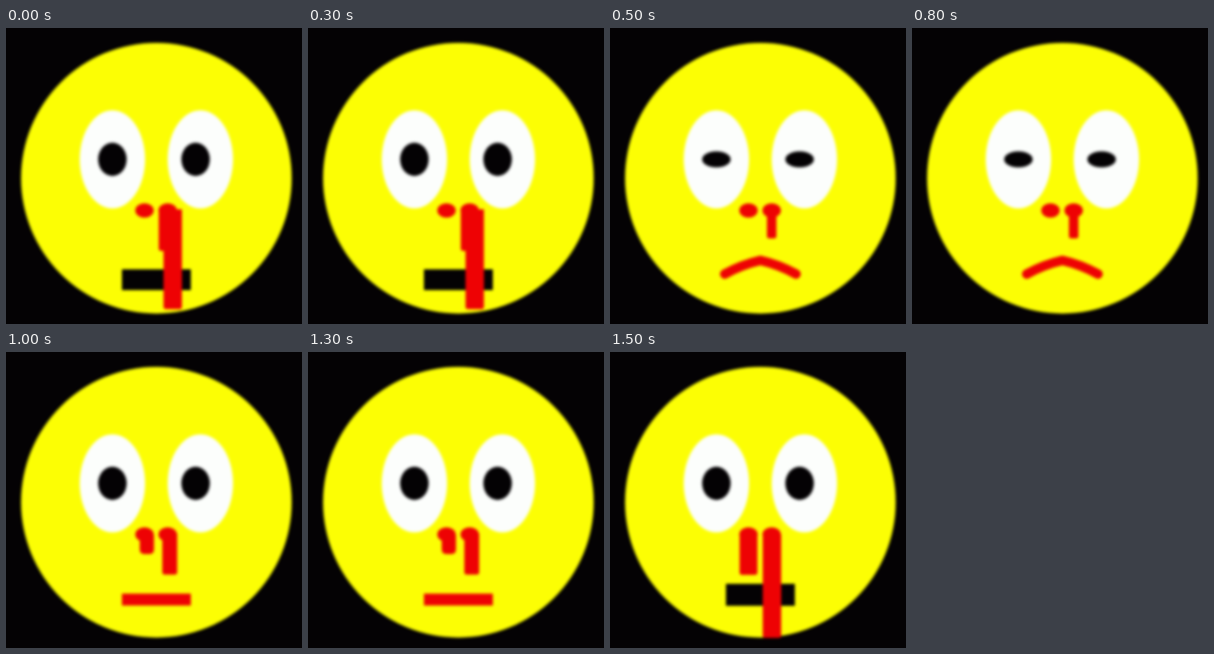
These frames come from a looping animation (498x498 px, 2 s). An HTML page:

```html
<!DOCTYPE html>
<html lang="en">
<head>
<meta charset="utf-8">
<title>Nosebleed face</title>
<style>
html, body { margin: 0; width: 100%; height: 100%; overflow: hidden; background: #040204; }
svg { display: block; width: 100vw; height: 100vh; }
</style>
</head>
<body>
<svg viewBox="0 0 498 498">
  <defs>
    <filter id="soft" filterUnits="userSpaceOnUse" x="0" y="0" width="498" height="498" color-interpolation-filters="sRGB">
      <feGaussianBlur stdDeviation="2.5"/>
    </filter>
  </defs>
  <rect width="498" height="498" fill="#040204"/>
  <g filter="url(#soft)">
    <circle cx="253" cy="252.7" r="227.7" fill="#fcfe04"/>
    <g fill="#fcfefc">
      <ellipse cx="179" cy="221" rx="55" ry="82.5"/>
      <ellipse cx="327" cy="221" rx="55" ry="82.5"/>
    </g>
    <g fill="#040204">
      <ellipse class="pupil" cx="179" cy="221" rx="24" ry="28"/>
      <ellipse class="pupil" cx="319" cy="221" rx="24" ry="28"/>
    </g>
    <path id="mouth" stroke-linejoin="round" stroke-linecap="round"/>
    <g fill="#ee0204">
      <ellipse cx="233" cy="307" rx="15.5" ry="12"/>
      <ellipse cx="272" cy="307" rx="15.5" ry="12"/>
      <path id="blood"/>
    </g>
  </g>
</svg>
<script>
const STEP = 500;
const RED = '#ee0204', BLACK = '#040204';
const mouth = document.getElementById('mouth');
const blood = document.getElementById('blood');
const pupils = document.querySelectorAll('.pupil');

const box = (l, t, r, b) => `M${l} ${t}H${r}V${b}H${l}Z`;

// A drip has a flat top and slightly rounded lower corners.
const drip = (l, t, r, b, c = 4) =>
  `M${l} ${t}H${r}V${b - c}Q${r} ${b} ${r - c} ${b}H${l + c}Q${l} ${b} ${l} ${b - c}Z`;

const poses = [
  { pupil: 28, color: BLACK, mouth: box(195, 406, 311, 441),
    blood: drip(257, 305, 295, 375) + drip(265, 305, 296, 473) },
  { pupil: 13.5, color: RED, line: 16, mouth: 'M193 414Q222 398 253 391Q284 398 313 414',
    blood: drip(264, 308, 280, 354) },
  { pupil: 28, color: RED, mouth: box(195, 406.5, 311, 426.5),
    blood: drip(225, 307, 249, 340, 8) + drip(263, 305, 288, 374.5) },
  { pupil: 28, color: BLACK, mouth: box(195, 390, 311, 427),
    blood: drip(218, 307, 248, 375) + drip(257, 307, 288, 481) }
];

let shown = -1;

function draw(time) {
  const i = Math.floor(time / STEP) % poses.length;
  if (i === shown) return;
  shown = i;
  const p = poses[i];
  pupils.forEach(e => e.setAttribute('ry', p.pupil));
  mouth.setAttribute('d', p.mouth);
  mouth.setAttribute('fill', p.line ? 'none' : p.color);
  mouth.setAttribute('stroke', p.line ? p.color : 'none');
  mouth.setAttribute('stroke-width', p.line || 0);
  blood.setAttribute('d', p.blood);
}

const start = performance.now();
function tick() {
  draw(performance.now() - start);
  requestAnimationFrame(tick);
}
tick();
</script>
</body>
</html>
```
